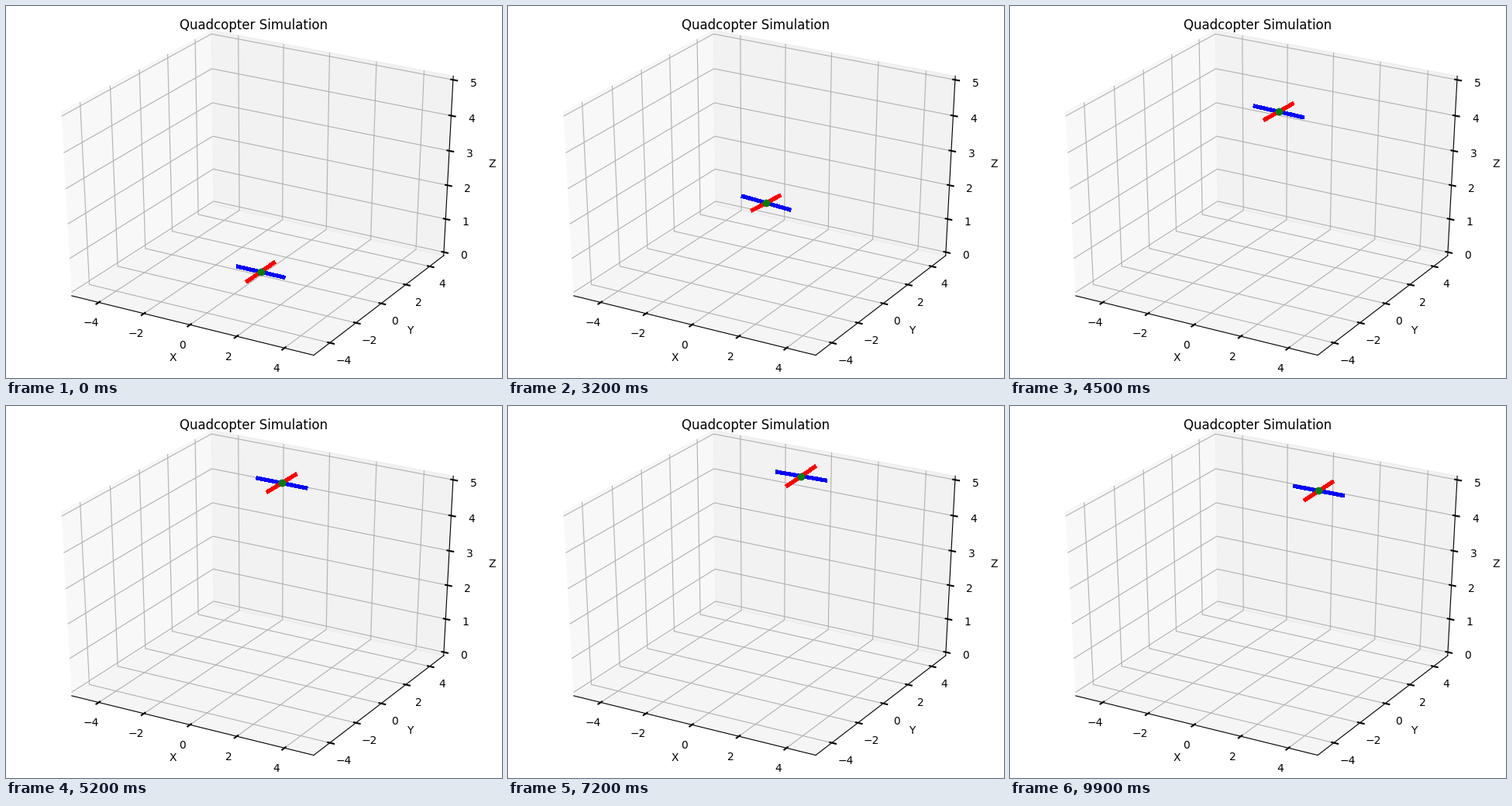
Write a matplotlib script that moves like this. It is 640 px wide and 480 px high and loops after 10000 ms.

```python
import numpy as np
import matplotlib.pyplot as plt
from matplotlib.animation import FuncAnimation
from matplotlib.collections import LineCollection
from matplotlib.patches import Polygon

FRAMES, INTERVAL = 100, 100
LOW, HIGH = np.array([-5.0, -5.0, 0.0]), np.array([5.0, 5.0, 5.0])
CENTER, SIZE = (LOW + HIGH) / 2, HIGH - LOW
DELTA = SIZE / 12
MIN, MAX = LOW - DELTA / 4, HIGH + DELTA / 4
BACK = np.array([MIN[0], MAX[1], MIN[2]])    # corner where the panes meet
FRONT = np.array([MAX[0], MIN[1], MAX[2]])   # opposite corner

# Camera at azimuth -60, elevation 30, ten units from the unit box
DIST = 10
AZ, EL = np.radians([-60, 30])
RIGHT = np.array([-np.sin(AZ), np.cos(AZ), 0])
UP = np.array([-np.cos(AZ) * np.sin(EL), -np.sin(AZ) * np.sin(EL), np.cos(EL)])
TOWARD = np.array([np.cos(AZ) * np.cos(EL), np.sin(AZ) * np.cos(EL), np.sin(EL)])


def project(points):
    p = (np.asarray(points, float) - CENTER) / SIZE
    depth = DIST - p @ TOWARD
    return np.stack([p @ RIGHT / depth, p @ UP / depth], axis=-1)


def corner(base, **coords):
    p = np.array(base, float)
    for name, value in coords.items():
        p["xyz".index(name)] = value
    return p


def outward(p, axis, points):
    """Push p away from the box centre, except along its own axis."""
    shift = points * 48 / (72 * (6.4 + 4.8)) * DELTA
    shift[axis] = 0
    return p + np.where(p < CENTER, -shift, shift)


fig = plt.figure(figsize=(6.4, 4.8), dpi=100, facecolor="white")
plt.rcParams["font.family"] = "DejaVu Sans"
ax = fig.add_axes([0, 0, 1, 1])
ax.set_xlim(-0.095, 0.09)
ax.set_ylim(-0.095, 0.09)
ax.axis("off")


def draw_pane(corners, grey):
    ax.add_patch(Polygon(project(corners), closed=False, facecolor=str(grey),
                         edgecolor=str(grey), alpha=0.5, linewidth=1, zorder=1))


def draw_axis(axis, edge, tick_dir, ticks, name):
    z = 2 + axis
    ends = np.array([edge, edge])
    ends[:, axis] = MIN[axis], MAX[axis]
    ax.plot(*project(ends).T, color="black", lw=0.8, zorder=z)
    ax.text(*project(outward(ends.mean(axis=0), axis, 25)), name,
            fontsize=10, ha="center", va="center", zorder=z)

    grid = []
    for value in ticks:
        line = np.array([BACK, BACK, BACK])
        line[:, axis] = value
        for row, side in ((0, (axis + 1) % 3), (2, (axis + 2) % 3)):
            line[row, side] = FRONT[side]
        grid.append(project(line))
    ax.add_collection(LineCollection(grid, colors="#b0b0b0", linewidths=0.8,
                                     zorder=z), autolim=False)

    out = np.sign(edge[tick_dir] - CENTER[tick_dir]) * DELTA[tick_dir]
    for value in ticks:
        at = edge.copy()
        at[axis] = value
        mark = np.array([at, at])
        mark[:, tick_dir] += -0.1 * out, 0.2 * out
        ax.plot(*project(mark).T, color="black", lw=1.5, zorder=z)
        ax.text(*project(outward(at, axis, 11.5)),
                str(value).replace("-", "\u2212"),
                fontsize=10, ha="center", va="top", zorder=z)


x0, y0, z0 = MIN
x1, y1, z1 = MAX
draw_pane([(x0, y0, z0), (x0, y1, z0), (x0, y1, z1), (x0, y0, z1)], 0.95)
draw_pane([(x0, y1, z0), (x1, y1, z0), (x1, y1, z1), (x0, y1, z1)], 0.9)
draw_pane([(x0, y0, z0), (x1, y0, z0), (x1, y1, z0), (x0, y1, z0)], 0.925)

draw_axis(0, corner(BACK, y=y0), 1, range(-4, 5, 2), "X")
draw_axis(1, corner(BACK, x=x1), 0, range(-4, 5, 2), "Y")
draw_axis(2, corner(BACK, x=x1), 0, range(6), "Z")

fig.text(0.5, 0.92 + 6 / 72 / 4.8, "Quadcopter Simulation",
         fontsize=12, ha="center", va="baseline")


def smooth(times, values):
    """Cubic Hermite curve through the keys, at rest before the first."""
    t, v = np.array(times), np.array(values)
    slope = np.gradient(v, t)
    slope[0] = 0

    def at(now):
        now = np.clip(now, t[0], t[-1])
        i = min(np.searchsorted(t, now, side="right") - 1, len(t) - 2)
        h = t[i + 1] - t[i]
        s = (now - t[i]) / h
        return ((1 + 2 * s) * (1 - s) ** 2 * v[i] + s * (1 - s) ** 2 * h * slope[i]
                + s * s * (3 - 2 * s) * v[i + 1] + s * s * (s - 1) * h * slope[i + 1])
    return at


FLIGHT = [1.9, 2.4, 3.0, 3.2, 4.1, 4.5, 5.2, 6.1, 6.3, 7.4, 8.3, 9.6, 9.9]
drift = smooth(FLIGHT, [0, 0.015, 0.062, 0.092, 0.27, 0.375, 0.56, 0.79, 0.84,
                        1.06, 1.214, 1.405, 1.447])
climb = smooth(FLIGHT, [0, 0.42, 1.618, 2.03, 3.93, 4.58, 5.345, 5.62, 5.63,
                        5.445, 5.235, 5.08, 5.05])
LEAN = [1.9, 2.4, 3.2, 4.5, 6.1, 8.3, 9.9]
pitch = smooth(LEAN, [0, 1.6, 2.5, 1.1, -0.6, -0.6, -0.2])
roll = smooth(LEAN, [0, 1.9, 2.9, 1.0, -1.8, -1.2, -0.8])

ARM = 1.0
arm_x, = ax.plot([], [], color="blue", lw=3, antialiased=False, zorder=6)
arm_y, = ax.plot([], [], color="red", lw=3, antialiased=False, zorder=6)
hub, = ax.plot([], [], color="green", marker="o", markersize=6,
               antialiased=False, zorder=6)


def update(frame):
    t = frame * INTERVAL / 1000
    pos = np.array([drift(t), drift(t), climb(t)])
    p, r = np.radians([pitch(t), roll(t)])
    along_x = ARM * np.array([np.cos(p), 0, -np.sin(p)])
    along_y = ARM * np.array([0, np.cos(r), -np.sin(r)])
    arm_x.set_data(*project([pos - along_x, pos + along_x]).T)
    arm_y.set_data(*project([pos - along_y, pos + along_y]).T)
    hub.set_data(*project([pos]).T)
    return arm_x, arm_y, hub


anim = FuncAnimation(fig, update, frames=FRAMES, interval=INTERVAL, repeat=True)
plt.show()
```
